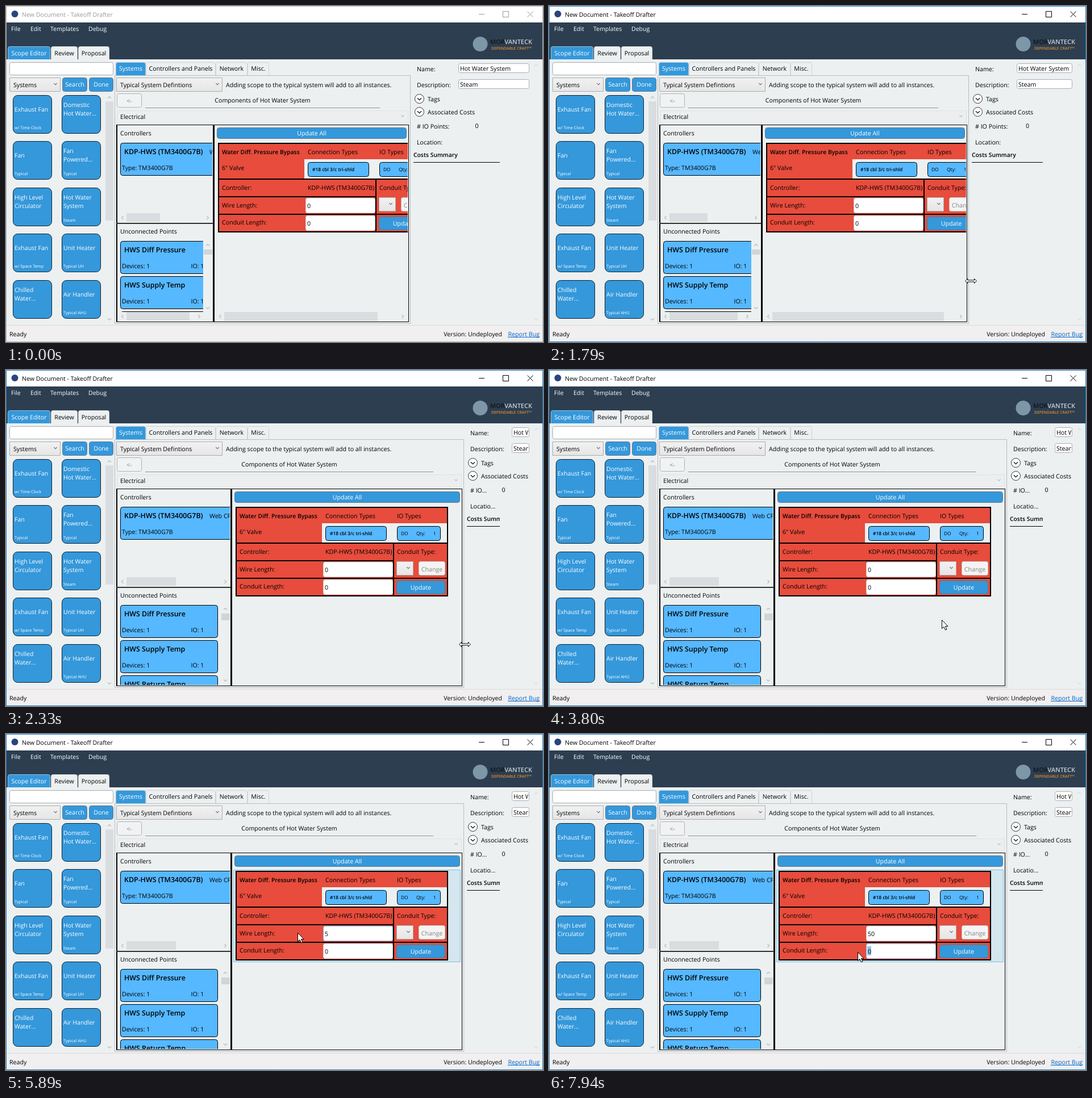
Write an HTML page with a canvas that moves like this. It is 945x592 px and loops after 8000 ms.

```html
<!DOCTYPE html>
<html lang="en">
<head>
<meta charset="utf-8">
<title>Desktop estimating tool</title>
<style>
html, body { margin: 0; width: 945px; height: 592px; overflow: hidden; }
canvas { display: block; }
</style>
</head>
<body>
<canvas id="stage" width="945" height="592"></canvas>
<script>
const ctx = document.getElementById('stage').getContext('2d');
ctx.textRendering = 'geometricPrecision';

const LOOP = 8000;
const BLUE = '#3498db', SKY = '#56b8ff', RED = '#e74c3c', PAPER = '#ecf0f1', NAVY = '#2c3e50';
const EDGE = '#abadb3', THUMB = '#dadddf', FAINT = '#b4b8ba', INK = '#000';
const MODEL = 'TM3400G7B', PANEL = `KDP-HWS (${MODEL})`;

// Each leg: start, end, number of steps, then the values reached
const POINTER = [
  [70, 70, 1, 705, 496], [240, 300, 2, 708, 493], [620, 920, 5, 709, 485],
  [1090, 1160, 2, 713, 484], [1700, 2020, 5, 786, 484], [2100, 2330, 4, 807, 483],
  [2940, 3250, 5, 772, 510], [3570, 4180, 9, 590, 352], [4350, 4820, 7, 522, 351],
  [4990, 5090, 2, 513, 351], [5400, 5400, 1, 513, 350], [6610, 6920, 5, 551, 367],
  [6990, 7380, 6, 575, 384], [7550, 7940, 6, 543, 384]
];
const DRAG = [[1700, 2020, 5, 68], [2100, 2330, 4, 94]];

function track(legs, start, t) {
  let value = start;
  for (const [from, to, steps, ...goal] of legs) {
    if (t < from) break;
    const gap = (to - from) / (steps - 1) || 1;
    const done = Math.min(steps, Math.floor((t - from) / gap + 1e-6) + 1) / steps;
    value = value.map((v, i) => v + (goal[i] - v) * done);
  }
  return value.map(Math.round);
}

function rect(x, y, w, h, color) {
  ctx.fillStyle = color;
  ctx.fillRect(x, y, w, h);
}

// Rounded box given by its left, top, right and bottom edges
function box(l, t, r, b, fill, stroke, radius = 0) {
  ctx.beginPath();
  ctx.roundRect(l + .5, t + .5, r - l - 1, b - t - 1, radius);
  if (fill) { ctx.fillStyle = fill; ctx.fill(); }
  if (stroke) { ctx.strokeStyle = stroke; ctx.lineWidth = 1; ctx.stroke(); }
}

function text(str, x, midY, { size = 10.65, color = INK, weight = 400, align = 'left' } = {}) {
  ctx.font = `${weight} ${size}px "Open Sans", sans-serif`;
  ctx.textAlign = align;
  ctx.fillStyle = color;
  ctx.fillText(str, x, midY + size * .36);
}

function poly(points, stroke, fill, width = 1) {
  ctx.beginPath();
  points.forEach(([x, y]) => ctx.lineTo(x, y));
  if (fill) { ctx.closePath(); ctx.fillStyle = fill; ctx.fill(); }
  ctx.strokeStyle = stroke;
  ctx.lineWidth = width;
  ctx.stroke();
}

function disc(x, y, radius, fill, stroke) {
  ctx.beginPath();
  ctx.arc(x, y, radius, 0, 7);
  ctx.fillStyle = fill;
  ctx.fill();
  if (stroke) { ctx.strokeStyle = stroke; ctx.lineWidth = 1; ctx.stroke(); }
}

function chevron(x, y, dir, color = FAINT, size = 3) {
  ctx.save();
  ctx.translate(x, y);
  ctx.rotate({ down: 0, left: 1, up: 2, right: 3 }[dir] * Math.PI / 2);
  poly([[-size, -size / 2], [0, size / 2], [size, -size / 2]], color, null, 1.1);
  ctx.restore();
}

function clipped(l, t, r, b, draw) {
  ctx.save();
  ctx.beginPath();
  ctx.rect(l, t, r - l, b - t);
  ctx.clip();
  draw();
  ctx.restore();
}

function button(label, l, t, r, b) {
  box(l, t, r, b, BLUE, '#64788a', 4);
  text(label, (l + r) / 2, (t + b) / 2, { color: '#fff', align: 'center' });
}

function combo(label, l, t, r, b) {
  const shade = ctx.createLinearGradient(0, t, 0, b);
  shade.addColorStop(0, '#f2f2f2');
  shade.addColorStop(1, '#e5e5e5');
  box(l, t, r, b, shade, '#acacac');
  text(label, l + 7, (t + b) / 2 + .5);
  chevron(r - 9, (t + b) / 2 - 1, 'down', '#606060', 2.6);
}

function tab(label, l, t, r, b, active) {
  box(l, t, r, b + 2, active ? BLUE : PAPER, active ? '#9fc0d6' : '#cfd3d5', [3, 3, 0, 0]);
  text(label, (l + r) / 2, (t + b) / 2 + .5, { color: active ? '#fff' : INK, align: 'center' });
}

function titleBar(active) {
  const ink = active ? INK : '#999';
  rect(0, 0, 945, 30, '#fff');
  disc(15.5, 14, 6, '#27457f');
  text('New Document - Takeoff Drafter', 28, 15, { color: ink });
  rect(832, 14, 10, 1, ink);
  box(874, 9, 885, 20, null, ink);
  poly([[917.5, 9.5], [927.5, 19.5]], ink);
  poly([[927.5, 9.5], [917.5, 19.5]], ink);
}

function header() {
  rect(0, 29, 945, 65, NAVY);
  [['File', 9], ['Edit', 43], ['Templates', 78], ['Debug', 145]]
    .forEach(([label, x]) => text(label, x, 40, { color: '#fff', size: 10.5 }));
  tab('Scope Editor', 3, 71, 78, 94, true);
  tab('Review', 79, 71, 126, 94);
  tab('Proposal', 127, 71, 182, 94);
  disc(834.5, 67, 13, '#7d97a9');
  text('MOR', 852, 63, { size: 11, weight: 600, color: '#10161c' });
  text('VANTECK', 926, 63, { size: 11, weight: 600, color: '#c9ced2', align: 'right' });
  text('DEPENDABLE CRAFT™', 854, 75, { size: 6.8, weight: 600, color: '#e08a30' });
  rect(0, 94, 945, 468, PAPER);
}

const CATALOG = [
  ['Exhaust Fan', 'w/ Time Clock'], ['Domestic|Hot Water...', ''],
  ['Fan', 'Typical'], ['Fan|Powered...', 'Typical'],
  ['High Level|Circulator', ''], ['Hot Water|System', 'Steam'],
  ['Exhaust Fan', 'w/ Space Temp'], ['Unit Heater', 'Typical UH'],
  ['Chilled|Water...', ''], ['Air Handler', 'Typical AHU']
];

function catalog() {
  box(6, 99, 189, 122, '#fff', EDGE, 3);
  combo('Systems', 6, 126, 96, 151);
  button('Search', 99, 126, 143, 151);
  button('Done', 146, 126, 189, 151);
  CATALOG.forEach(([name, note], i) => {
    const x = i % 2 ? 98 : 12, y = Math.round(157 + Math.floor(i / 2) * 81.4);
    box(x, y, x + 69, y + 68, BLUE, '#10202c', 8);
    const lines = name.split('|');
    lines.forEach((line, k) =>
      text(line, x + 3, y + 25 + (k * 2 - lines.length + 1) * 7.5, { color: '#fff', size: 10.5 }));
    text(note, x + 3, y + 57, { color: '#fff', size: 7.3 });
  });
  chevron(182, 161, 'up');
  rect(175, 168, 14, 210, THUMB);
  chevron(182, 552, 'down');
}

function pointCard(name, y, right) {
  box(201, y, right, y + 58, SKY, INK, 4);
  text(name, 208, y + 16, { size: 12.4, weight: 600 });
  text('Devices: 1', 204, y + 44);
  text('IO: 1', 325.5, y + 44);
}

function leftPane(third) {
  const edge = 363 + third, view = 347 + third;
  text('Controllers', 201, 224);
  clipped(197, 211, edge, 382, () => {
    box(201, 241, 520, 299, SKY, INK, 4);
    text(PANEL, 208, 257, { size: 12.4, weight: 600 });
    text('Web CPU', 358, 257);
    text('Type: ' + MODEL, 204, 285);
  });
  chevron(205, 373, 'left');
  rect(212, 365, Math.round(59 + third * .9), 15, THUMB);
  chevron(355 + third, 373, 'right');

  text('Unconnected Points', 201, 397);
  const scrolls = view < 361;
  clipped(197, 385, view, scrolls ? 539 : 555, () =>
    ['HWS Diff Pressure', 'HWS Supply Temp', 'HWS Return Temp'].forEach((name, i) =>
      pointCard(name, 414 + i * 62, Math.max(361, 342 + third))));
  chevron(355 + third, 421, 'up');
  rect(348 + third, 429, 15, scrolls ? 9 : 12, '#d2d5d7');
  chevron(355 + third, scrolls ? 532 : 547, 'down');
  if (scrolls) {
    chevron(205, 547, 'left');
    rect(212, 539, 111 + third, 15, THUMB);
    chevron(340 + third, 547, 'right');
  }
}

function field(value, x, y, focused, selected) {
  box(x + 154, y, x + 277, y + 27, '#fff', focused ? '#7eb4ea' : '#d0d0d0', 3);
  if (selected) rect(x + 156, y + 5, 7, 16, '#94c3ee');
  text(value, x + 157, y + 14);
}

function wiring(x, t) {
  const pen = { size: 8.4 }, bold = { weight: 600, size: 10.3 };
  rect(x, 241, 374, 158, INK);
  rect(x + 2, 243, 370, 154, RED);
  rect(x + 152, 270, 220, 34, PAPER);
  text('Water Diff. Pressure Bypass', x + 7, 257, bold);
  text('Connection Types', x + 158, 257);
  text('IO Types', x + 284, 257);
  text('6" Valve', x + 7, 285);
  box(x + 158, 275, x + 266, 301, SKY, INK, 4);
  text('#18 cbl 3/c tri-shld', x + 166, 288, { ...pen, weight: 600 });
  box(x + 284, 275, x + 361, 301, SKY, INK, 4);
  text('DO', x + 291, 288, pen);
  text('Qty:', x + 318, 288, pen);
  text('1', x + 348, 288, pen);
  rect(x, 304, 374, 2, INK);
  rect(x, 335, 279, 2, INK);
  rect(x, 366, 374, 2, INK);
  rect(x + 277, 304, 2, 94, INK);
  text('Controller:', x + 7, 320);
  text(PANEL, x + 158, 320);
  text('Conduit Type:', x + 284, 320);
  text('Wire Length:', x + 7, 351);
  text('Conduit Length:', x + 7, 381);
  field(t < 5890 ? '0' : t < 6060 ? '5' : '50', x, 338, t >= 4350 && t < 7550, t >= 4580 && t < 5890);
  field('0', x, 369, t >= 7550, t >= 7700);
  combo('', x + 283, 337, x + 313, 362);
  box(x + 322, 337, x + 369, 362, '#f4f4f4', '#c4c8ca', 3);
  text('Change', x + 345.5, 351, { color: '#838383', align: 'center' });
  button('Update', x + 283, 371, x + 369, 395);
}

function rightPane(shift, third, t, hover) {
  const x = 373 + third;
  button('Update All', 371 + third, 214, 705 + shift, 234);
  if (hover) box(x - 4, 239, 706 + shift, 402, '#d4e6ee', '#7cc0e4');
  clipped(x - 5, 236, 707 + shift, 540, () => wiring(x, t));
  if (shift < 70) {
    chevron(377 + third, 547, 'left');
    rect(384 + third, 539, Math.round(270 + shift * 1.18), 16, THUMB);
    chevron(698 + shift, 547, 'right');
  }
}

function systems(shift, third, t, hover) {
  box(191, 122, 712 + shift, 560, PAPER, '#b9bdbf');
  tab('Systems', 193, 99, 246, 121, true);
  tab('Controllers and Panels', 246, 99, 369, 121);
  tab('Network', 369, 99, 425, 121);
  tab('Misc.', 425, 99, 463, 121);
  rect(246, 122, 466 + shift, 1, '#b9bdbf');
  rect(192, 123, 272, 2, PAPER);
  combo('Typical System Defintions', 194, 126, 381, 151);
  text('Adding scope to the typical system will add to all instances.', 387, 139);
  box(195, 154, 239, 179, '#f1f2f3', '#b0b3b5', 3);
  text('<-', 217, 167, { color: '#777', align: 'center' });
  text('Components of Hot Water System', 451.5 + shift / 2, 166, { align: 'center' });
  rect(245, 179, 413 + shift, 1, '#8d9193');
  box(195, 184, 708 + shift, 207, '#eceeef', '#dfe2e3');
  text('Electrical', 201, 195);
  chevron(698 + shift, 194, 'down', FAINT, 2.6);

  leftPane(third);
  rightPane(shift, third, t, hover);
  rect(194, 209, 515 + shift, 1, INK);
  rect(194, 209, 2, 348, INK);
  rect(194, 556, 515 + shift, 1, INK);
  rect(708 + shift, 209, 1, 348, INK);
  rect(364 + third, 209, 3, 348, INK);
  rect(194, 382, 171 + third, 2, '#2d352d');
}

function details(shift) {
  const x = 723 + shift, narrow = shift > 85;
  [['Name:', 'Hot Water System', 101], ['Description:', 'Steam', 129]].forEach(([label, value, y]) => {
    text(label, x, y + 10);
    box(796 + shift, y, 921, y + 17, '#fff', EDGE, 3);
    clipped(797 + shift, y, 919, y + 17, () => text(value, 799 + shift, y + 9));
  });
  [['Tags', 163], ['Associated Costs', 186]].forEach(([label, y]) => {
    disc(x + 4.5, y + .5, 8, '#fff', '#333');
    chevron(x + 4.5, y + 1, 'down', INK, 3.5);
    text(label, x + 19, y + 1);
  });
  text(narrow ? '# IO...' : '# IO Points:', x, 212);
  text('0', 828.5 + shift / 2, 211, { align: 'center' });
  text(narrow ? 'Locatio...' : 'Location:', x, 240);
  clipped(x - 8, 250, 869, 280, () => text('Costs Summary', x - 6, 262, { weight: 600, size: 10.35 }));
  rect(x - 6, 275, 152 - shift, 1, INK);
  chevron(933, 104, 'up', '#d8dcde');
  chevron(933, 552, 'down', '#d8dcde');
}

function statusBar() {
  rect(0, 562, 945, 30, '#f1eff0');
  rect(0, 562, 945, 1, '#dcdcdc');
  text('Ready', 6, 578);
  text('Version: Undeployed', 873, 578, { align: 'right' });
  text('Report Bug', 939, 578, { align: 'right', color: '#0066cc' });
  rect(883, 583, 56, 1, '#0066cc');
}

function pointer(x, y, t) {
  const inField = x > 558 && x < 680 && ((y > 338 && y < 365) || (y > 369 && y < 396));
  ctx.save();
  ctx.translate(x + .5, y + .5);
  if (t >= 1160 && t < 2940) {
    poly([[-10, 0], [-6, -4], [-6, -1.5], [6, -1.5], [6, -4], [10, 0],
      [6, 4], [6, 1.5], [-6, 1.5], [-6, 4], [-10, 0]], INK, '#fff');
  } else if (inField) {
    poly([[-3, -8], [3, -8]], INK);
    poly([[0, -8], [0, 8]], INK);
    poly([[-3, 8], [3, 8]], INK);
  } else {
    poly([[0, 0], [0, 15], [3.5, 12], [6, 17.5], [8.5, 16.5], [6, 11], [10.5, 11]], INK, '#fff');
  }
  ctx.restore();
}

function draw(now) {
  const t = now % LOOP;
  const [shift] = track(DRAG, [0], t);
  const [px, py] = track(POINTER, [705, 496], t);
  const active = t >= 1470;
  titleBar(active);
  header();
  catalog();
  systems(shift, Math.round(shift / 3), t, t >= 3570 && py < 400);
  details(shift);
  statusBar();
  box(0, 0, 945, 592, null, active ? '#1883d7' : '#b5b8bc');
  if (t >= 70) pointer(px, py, t);
  requestAnimationFrame(draw);
}
requestAnimationFrame(draw);
</script>
</body>
</html>
```
